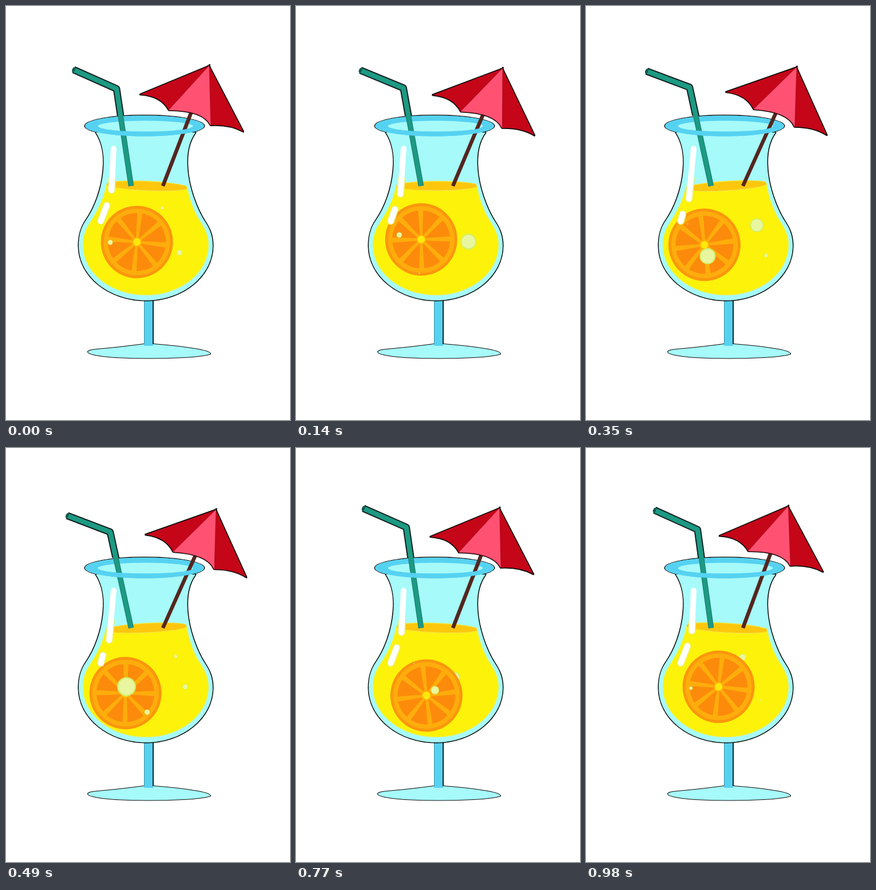
Animation of 496 by 720 pixels, one loop 1050 ms. Source, as an HTML page with a canvas:

```html
<!DOCTYPE html>
<html lang="en">
<head>
<meta charset="utf-8">
<title>Cocktail</title>
<style>
  html, body { margin: 0; width: 100%; height: 100%; overflow: hidden; background: #fff; }
  canvas { display: block; }
</style>
</head>
<body>
<canvas id="stage" width="496" height="720"></canvas>
<script>
const ctx = document.getElementById('stage').getContext('2d');
const STEP = 70, STEPS = 15, TAU = Math.PI * 2, DEG = Math.PI / 180;
const AQUA = '#a6faf9', BLUE = '#56d2f1', YELLOW = '#fdf20a', RED = '#c50518', PINK = '#ff5272', INK = '#0c0c0c';

const glass = new Path2D(`M157 220 C170 240 172 265 170 285 C167 320 154 352 140 372
  C130 386 127 400 127 417 C127 470 180 512 245 512 C308 512 361 470 361 417
  C361 398 355 386 347 374 C333 352 319 315 317 282 C315 255 320 235 331 220 Z`);
const bowl = new Path2D(`M178 298 C174 335 158 360 148 376 C139 389 135 400 135 415
  C135 465 185 502 245 502 C303 502 353 465 353 415
  C353 398 345 385 338 374 C326 355 318 335 313 298 Z`);
const foot = new Path2D(`M143 601 Q146 598 160 597 Q205 593 241 588 L257 588
  Q300 591 335 597 Q357 601 357 605 Q345 609 310 611 Q250 614 190 611 Q142 607 143 601 Z`);
const canopy = new Path2D('M0 0 L-120 50 Q-84 52 -70 77 Q-10 77 3 103 Q37 101 60 114 Z');
const middle = new Path2D('M0 0 L-70 77 Q-10 77 3 103 Z');

// Every bubble swells and shrinks while it rises
const LIFE = 10.5;
const rearBubble = { birth: 6.3, x: 281, y: 456, size: 10.5, rise: 126 };
const frontBubbles = [
  { birth: 11, x: 186, y: 437, size: 5, rise: 68 },
  { birth: 13, x: 305, y: 448, size: 16, rise: 100 },
  { birth: 1.2, x: 216, y: 473, size: 17, rise: 105 },
  { birth: 1.5, x: 318, y: 466, size: 4.6, rise: 97 },
  { birth: 4.3, x: 249, y: 485, size: 8.8, rise: 100 }
];

// Cosine with a whole number of turns per loop, highest at step `peak`
const wave = (k, peak, turns = 1) => Math.cos(TAU * turns * (k - peak) / STEPS);

function ellipse(x, y, rx, ry, fill, tilt = 0) {
  ctx.beginPath();
  ctx.ellipse(x, y, rx, ry, tilt, 0, TAU);
  ctx.fillStyle = fill;
  ctx.fill();
}

function line(points, color, width, cap = 'butt') {
  ctx.beginPath();
  for (const [x, y] of points) ctx.lineTo(x, y);
  ctx.strokeStyle = color;
  ctx.lineWidth = width;
  ctx.lineCap = cap;
  ctx.lineJoin = 'round';
  ctx.stroke();
}

// Filled shape with its outline showing on the outside only
function shape(path, fill, edge, width) {
  ctx.lineJoin = 'round';
  ctx.strokeStyle = edge;
  ctx.lineWidth = width * 2;
  ctx.stroke(path);
  ctx.fillStyle = fill;
  ctx.fill(path);
}

function within(clip, draw) {
  ctx.save();
  ctx.clip(clip);
  draw();
  ctx.restore();
}

function box(x, y, w, h) {
  const path = new Path2D();
  path.rect(x, y, w, h);
  return path;
}

function bubble({ birth, x, y, size, rise }, k) {
  const u = (k - birth + STEPS) % STEPS / LIFE;
  if (u >= 1) return;
  const r = size * Math.sin(Math.PI * u) ** 2;
  ellipse(x - 10 * u, y - rise * u, r, r, '#d2ee66');
  ellipse(x - 10 * u, y - rise * u, r * 0.86, r * 0.86, '#e9f6a0');
}

function slice(x, y, angle) {
  ctx.save();
  ctx.translate(x, y);
  ctx.rotate(angle * DEG);
  ellipse(0, 0, 63, 63, '#fb960d');
  ellipse(0, 0, 58, 58, '#fdad0c');
  ellipse(0, 0, 50.5, 50.5, '#fd8b0b');
  ctx.fillStyle = '#fdad0c';
  for (let i = 0; i < 8; i++) {
    ctx.beginPath();
    ctx.moveTo(0, -2);
    ctx.lineTo(52, -4.5);
    ctx.lineTo(52, 4.5);
    ctx.lineTo(0, 2);
    ctx.fill();
    ctx.rotate(TAU / 8);
  }
  ellipse(0, 0, 9, 9, '#fdad0c');
  ellipse(0, 0, 6.5, 6.5, '#fde80b');
  ctx.restore();
}

function rim() {
  ctx.beginPath();
  ctx.ellipse(242, 208.5, 104, 18, 0, 0, TAU);
  ctx.ellipse(243.5, 209, 83, 9.5, 0, 0, TAU);
  ctx.fillStyle = BLUE;
  ctx.fill('evenodd');
}

function straw(x, y, sway) {
  const tip = [x - 75, y - 31 + 3 * sway];
  const points = [[218.5, 313], [x, y], tip];
  within(box(0, 0, 496, 191), () => line(points, INK, 12.5));
  line(points, '#14796a', 9.5);
  line(points, '#1d9a83', 7.5);
  ellipse(...tip, 2.5, 4.5, '#12594f', 0.4);
}

function umbrella(x, y) {
  const lean = Math.atan2(x - 274, 313 - y) - Math.atan2(80, 209);
  line([[274, 313], [x, y]], '#54261f', 6.5);
  ctx.save();
  ctx.translate(x, y);
  ctx.rotate(lean);
  line([[0, 3], [1, -3]], INK, 3);
  shape(canopy, RED, INK, 1.7);
  shape(middle, PINK, '#a3172c', 0.5);
  ctx.restore();
}

function liquid(tilt) {
  ctx.save();
  ctx.translate(246, 313);
  ctx.rotate(tilt);
  ctx.clip(box(-200, 0, 400, 250));
  ctx.rotate(-tilt);
  ctx.translate(-246, -313);
  shape(bowl, YELLOW, '#e3f16a', 1.3);
  ctx.restore();
  within(bowl, () => {
    ellipse(246, 313, 74, 9, '#f6e640', tilt);
    ellipse(246, 313, 72, 7.5, '#fdc70e', tilt);
  });
}

function shine(sway) {
  const long = [[188, 248], [182.5 - 2.7 * sway, 326.5 + 9 * sway]];
  const short = [[173 - 4.4 * sway, 353 + 9 * sway], [165.5, 374]];
  within(bowl, () => [long, short].forEach(p => line(p, '#e9f07a', 13, 'round')));
  [long, short].forEach(p => line(p, '#fff', 10, 'round'));
}

function render(k) {
  const sway = wave(k, 5.6);
  ctx.fillStyle = '#fff';
  ctx.fillRect(0, 0, 496, 720);

  shape(foot, AQUA, INK, 1.1);
  ctx.fillStyle = BLUE;
  ctx.fillRect(241, 508, 16, 83);
  line([[257, 508], [257, 588]], INK, 1.8);
  line([[241.5, 511], [241.5, 588]], '#357f91', 0.8);

  ellipse(242, 208.5, 105.5, 19.5, INK);
  shape(glass, AQUA, INK, 1.5);
  ellipse(242, 208.5, 104, 18, AQUA);
  rim();

  liquid(-3.6 * sway * DEG);
  within(bowl, () => {
    bubble(rearBubble, k);
    slice(219.5 - 13 * sway, 419.5 - 13.5 * wave(k, 2), 3 * k - 6 - 17 * sway);
  });
  straw(188 - 7.3 * sway, 142 + 3.3 * wave(k, 0.3, 2) + 1.8 * sway, sway);
  umbrella(360 + 7.7 * sway, 106.3 + 2.9 * sway + 2.5 * wave(k, 1.9, 2));
  within(box(130, 210, 230, 20), rim);
  shine(sway);
  frontBubbles.forEach(b => bubble(b, k));
}

function tick(now) {
  render(Math.floor(now / STEP) % STEPS);
  requestAnimationFrame(tick);
}

render(0);
requestAnimationFrame(tick);
</script>
</body>
</html>
```
